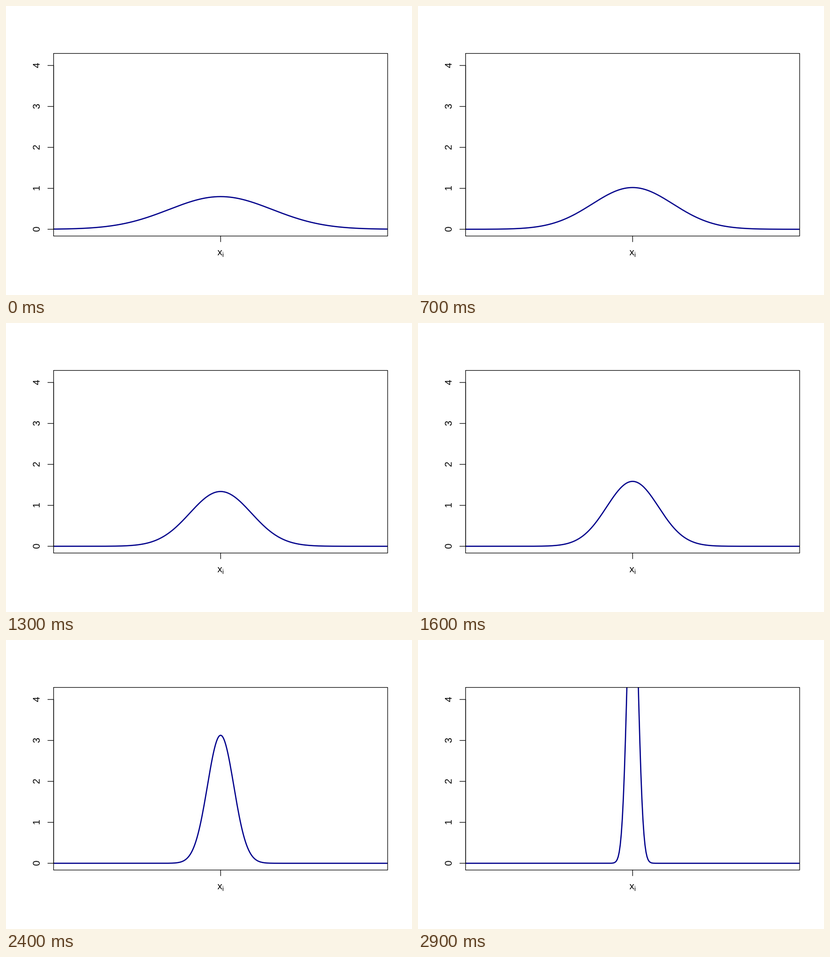
Write a matplotlib script that moves like this. It is 885 by 632 pixels and loops after 3 s.

```python
import numpy as np
import matplotlib.pyplot as plt
from matplotlib.animation import FuncAnimation
from matplotlib.patches import PathPatch, Rectangle
from matplotlib.textpath import TextPath
from matplotlib.transforms import Affine2D

W, H, DPI = 885, 632, 128
FRAMES, INTERVAL = 30, 100

# Plot box and data scale, in pixels (y points down)
LEFT, RIGHT, TOP, BOTTOM = 103.7, 831.9, 103.7, 503.05
MID = (LEFT + RIGHT) / 2
X_UNIT = (RIGHT - LEFT) / 3.24
Y_UNIT = 89.55
Y_ZERO = 488.27
TICK = 12.64
FONT = 21.07
THIN, THICK = 1.317, 2.634


def points(px):
    return px * 72 / DPI


def line(xs, ys, color="black", width=THIN, **kw):
    (artist,) = ax.plot(xs, ys, color=color, lw=points(width), snap=False,
                        solid_capstyle="round", solid_joinstyle="round", **kw)
    return artist


def label(text, x, y, size=FONT, angle=0):
    path = TextPath((0, 0), text, size=size, prop={"family": "Liberation Sans"})
    place = Affine2D().rotate_deg(angle).scale(1, -1).translate(x, y)
    ax.add_patch(PathPatch(place.transform_path(path), fc="black", lw=0,
                           snap=False, zorder=4))


fig = plt.figure(figsize=(W / DPI, H / DPI), dpi=DPI, facecolor="white")
ax = fig.add_axes([0, 0, 1, 1])
ax.set_xlim(0, W)
ax.set_ylim(H, 0)
ax.axis("off")

box = Rectangle((LEFT, TOP), RIGHT - LEFT, BOTTOM - TOP, fill=False, ec="black",
                lw=points(THIN), joinstyle="round", snap=False, zorder=3)
ax.add_patch(box)

# Vertical axis
line([LEFT, LEFT], [Y_ZERO, Y_ZERO - 4 * Y_UNIT], zorder=3)
for value in range(5):
    y = Y_ZERO - value * Y_UNIT
    line([LEFT - TICK, LEFT], [y, y], zorder=3)
    label(str(value), 73.3, y + 0.278 * FONT, angle=90)

# Horizontal axis
line([MID, MID], [BOTTOM, BOTTOM + TICK], zorder=3)
label("x", MID - 6.9, 545.1)
label("i", MID + 3.65, 548.7, size=0.7 * FONT)

xs = np.linspace(-2, 2, 401)
curve = line(MID + X_UNIT * xs, 0 * xs, color="#00008B", width=THICK, zorder=2)
curve.set_clip_path(Rectangle((LEFT, TOP), RIGHT - LEFT, BOTTOM - TOP,
                              transform=ax.transData))


def update(i):
    sigma = 0.5 - 0.45 * i / (FRAMES - 1)
    density = np.exp(-0.5 * (xs / sigma) ** 2) / (sigma * np.sqrt(2 * np.pi))
    curve.set_ydata(Y_ZERO - Y_UNIT * density)
    return [curve]


anim = FuncAnimation(fig, update, frames=FRAMES, interval=INTERVAL,
                     repeat=True, repeat_delay=0)
plt.show()
```
